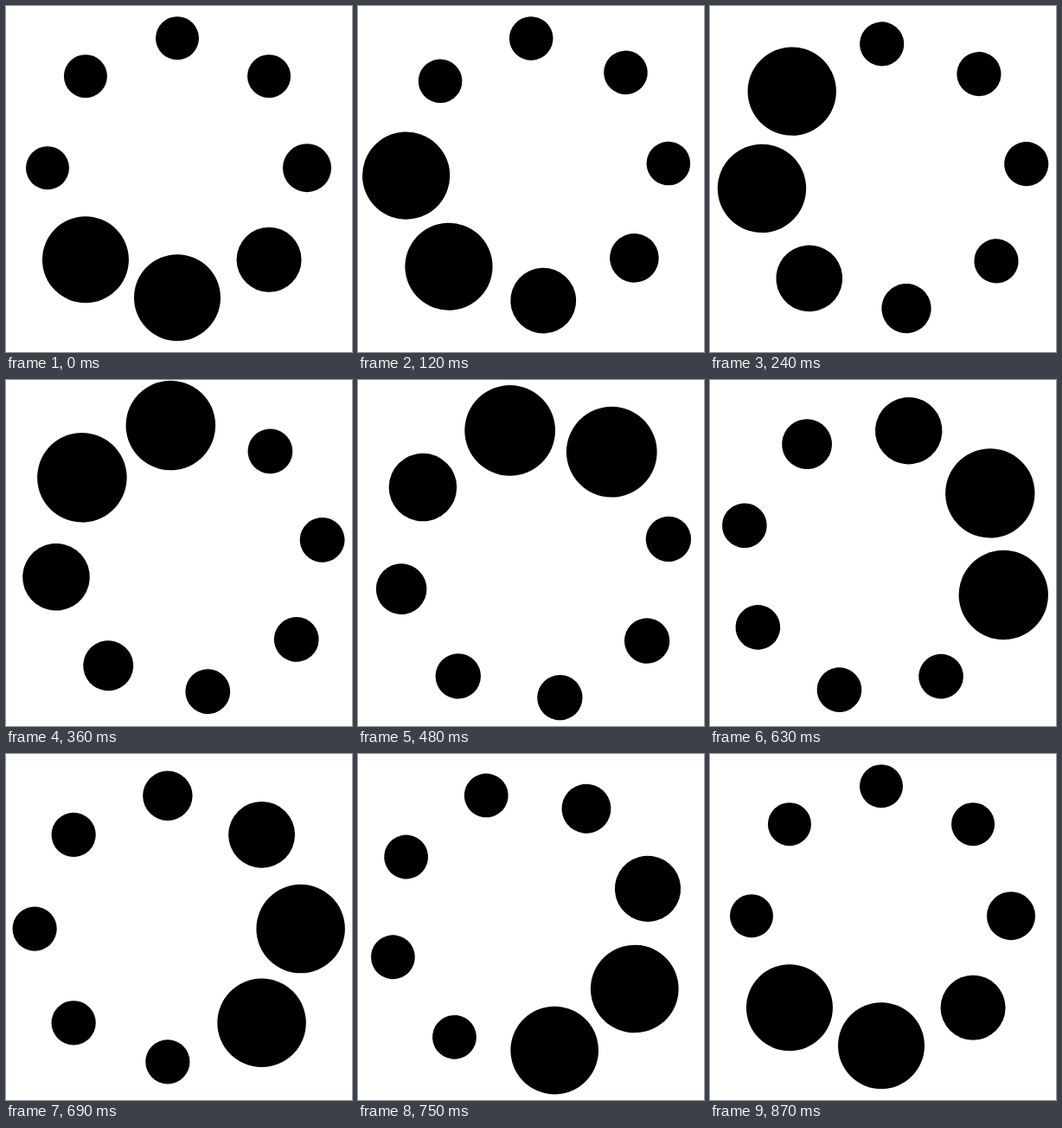
Animation, 400 px wide and 400 px high, one loop 0.9 s. Source, as an HTML page:

```html
<!DOCTYPE html>
<html lang="en">
<head>
<meta charset="utf-8">
<title>Loading spinner</title>
<style>
  html, body { margin: 0; width: 100%; height: 100%; overflow: hidden; background: #fff; }
  svg { display: block; width: 100vw; height: 100vh; }
</style>
</head>
<body>
<svg viewBox="0 0 400 400"><g id="ring"></g></svg>
<script>
  const STEP = 30, STEPS = 30, HALF = 17, LAST = STEPS - 1;
  const RING = { x: -2, y: -12.8, radius: 150 };  // relative to the pivot
  const DOTS = [25, 25, 28, 37.5, 50, 50, 25, 25]; // clockwise from the top
  const ring = document.getElementById('ring');

  DOTS.forEach((r, i) => {
    const angle = i * Math.PI / 4;
    const dot = document.createElementNS('http://www.w3.org/2000/svg', 'circle');
    dot.setAttribute('cx', RING.x + RING.radius * Math.sin(angle));
    dot.setAttribute('cy', RING.y - RING.radius * Math.cos(angle));
    dot.setAttribute('r', r);
    ring.append(dot);
  });

  // Slow half turn while growing 5 %, then a faster half turn while shrinking back.
  function draw(now) {
    const step = Math.floor(now / STEP) % STEPS;
    const turn = step <= HALF ? step / HALF : 1 + (step - HALF) / (LAST - HALF);
    const scale = 1 + 0.05 * (1 - Math.abs(1 - turn));
    ring.setAttribute('transform', `translate(200 200) rotate(${turn * 180}) scale(${scale})`);
  }

  function tick() {
    draw(performance.now());
    requestAnimationFrame(tick);
  }
  tick();
</script>
</body>
</html>
```
